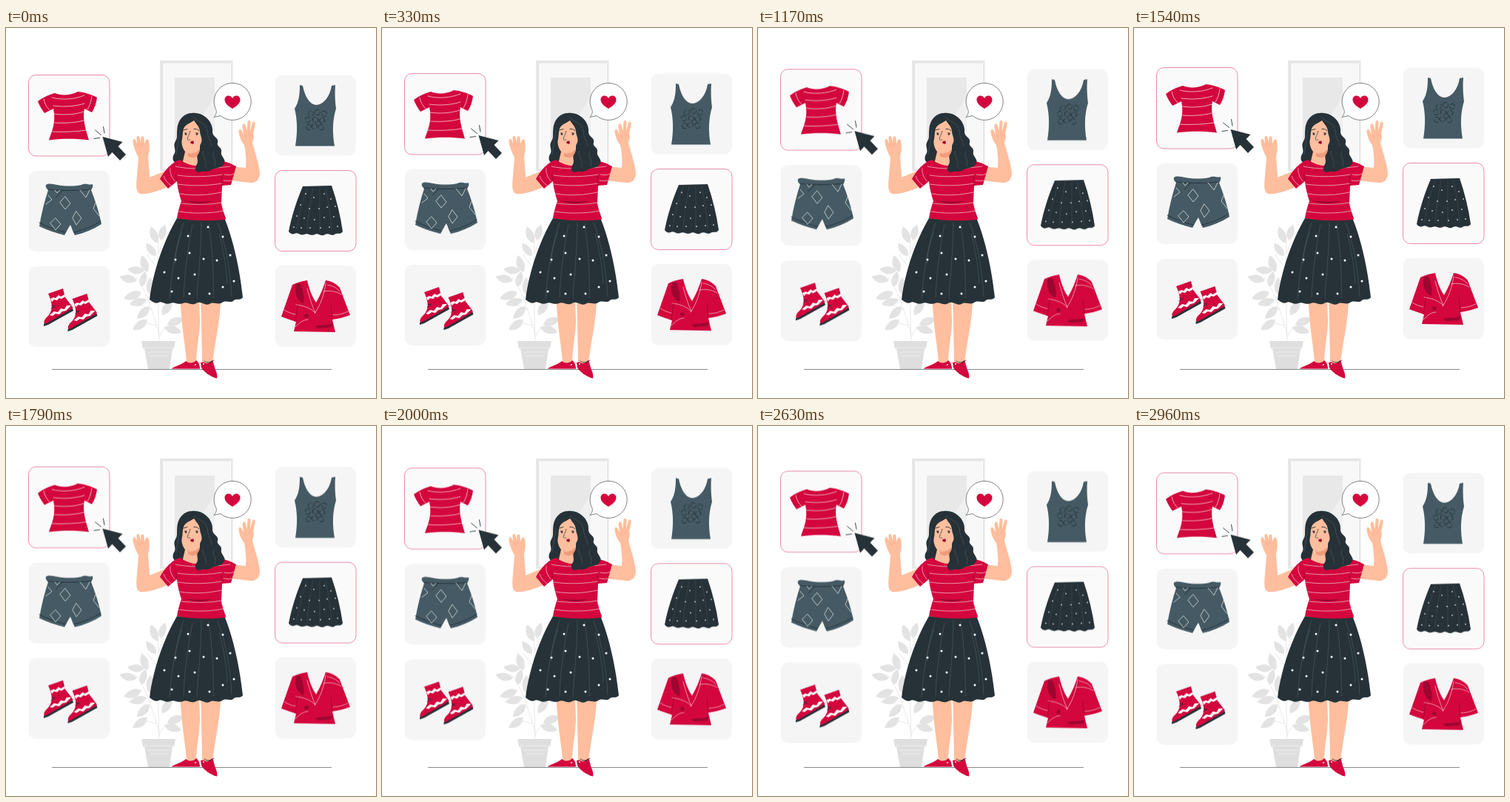
An HTML page without scripts for the animation above (3000 ms loop, 500 by 500 pixels).

```html
<!DOCTYPE html>
<html lang="en">
<head>
<meta charset="utf-8">
<title>Choosing clothes</title>
<style>
  html, body { margin: 0; width: 100%; height: 100%; overflow: hidden; background: #fff; }
  svg { display: block; width: 100vw; height: 100vh; }
  .red { fill: #d3073d; }
  .wine { fill: #9c0630; }
  .dark { fill: #263238; }
  .slate { fill: #455a64; }
  .skin { fill: #ffbe9d; }
  .card { fill: #f5f5f5; }
  .picked { fill: #fafafa; stroke: #d3073d; stroke-width: .45; }
  .line { fill: none; stroke: #fff; stroke-width: .65; stroke-linecap: round; }
  .ink { fill: none; stroke: #263238; stroke-width: .9; stroke-linecap: round; }
  .fold { fill: none; stroke: #52656e; stroke-width: .5; }
  .dots { fill: none; stroke: #fff; stroke-linecap: round; }
  .float { animation: float 3s infinite steps(36); }
  @keyframes float { 50% { transform: translateY(-10px); } }
</style>
</head>
<body>
<svg viewBox="0 0 500 500">
  <defs>
    <path id="leaf" d="M0 0C-7 -6 -7 -14 0 -22C6 -14 6 -6 0 0Z"/>
    <path id="spot" d="M-2 3C-5 1 -4 -3 -1 -3M2 -3C5 -1 4 3 1 3"/>
    <g id="boot">
      <path class="red" d="M57 359L77 352L80 364L90 377L90 381L53 401C50 399 51 394 56 390C63 383 64 374 57 359Z"/>
      <path d="M60 366L64 364L67 365L71 361L74 363L79 360L80 363L75 366L72 365L69 368L65 367L62 370Z" fill="#fff"/>
      <path d="M59 388L65 383L70 384L74 379L79 380L82 375L88 375L84 379L81 382L76 383L72 387L67 386L63 389Z" fill="#fff"/>
      <path class="ink" d="M62 375L66 377M61 379L66 375" stroke-width=".7"/>
      <path class="dark" d="M51 400L55 399L90 379L91 382L57 401L51 403Z"/>
    </g>
  </defs>

  <!-- wall frame -->
  <rect x="208" y="44" width="98.500" height="149" fill="#e6e6e6"/>
  <rect x="212" y="47.500" width="92" height="143" fill="#f8f8f8"/>
  <rect x="228" y="67" width="54" height="110" fill="#e8e8e8"/>
  <path d="M282 92V177H230Z" fill="#f0f0f0"/>
  <path d="M303.500 47V193" stroke="#fff"/>

  <!-- plant -->
  <g fill="#e3e3e3">
    <path d="M207 424C206 390 205 340 206 288M207 415C202 395 190 355 176 337M207 418C212 405 219 400 227 392M205 325L190 306M206 305L213 284M198 381L172 370M203 402L182 397" fill="none" stroke="#e0e0e0" stroke-width=".7"/>
    <use href="#leaf" transform="translate(205 291) rotate(-22) scale(1.1)"/>
    <use href="#leaf" transform="translate(209 287) rotate(16)"/>
    <use href="#leaf" transform="translate(203 308) rotate(-38)"/>
    <use href="#leaf" transform="translate(191 330) rotate(-18) scale(1.1)"/>
    <use href="#leaf" transform="translate(187 328) rotate(-85) scale(1.05)"/>
    <use href="#leaf" transform="translate(177 341) rotate(-78) scale(1.1)"/>
    <use href="#leaf" transform="translate(183 350) rotate(15)"/>
    <use href="#leaf" transform="translate(183 357) rotate(-110) scale(1.15)"/>
    <use href="#leaf" transform="translate(190 367) rotate(-105) scale(1.1)"/>
    <use href="#leaf" transform="translate(194 376) rotate(-135) scale(1.1)"/>
    <use href="#leaf" transform="translate(191 394) rotate(-125) scale(1.1)"/>
    <use href="#leaf" transform="translate(197 363) rotate(-5) scale(1.2)"/>
    <use href="#leaf" transform="translate(211 388) rotate(35) scale(1.1)"/>
    <use href="#leaf" transform="translate(218 401) rotate(70) scale(1.1)"/>
    <use href="#leaf" transform="translate(214 405) rotate(105) scale(1.1)"/>
  </g>
  <path d="M183 423H229L227 433H225L221 461H192L187 433H185Z" fill="#dedede"/>
  <path d="M186 432H226M191 438H222M194 443H219" fill="none" stroke="#f0f0f0" stroke-width=".8"/>
  <path d="M62 461.400H440" stroke="#263238" stroke-width=".6"/>

  <!-- speech bubble -->
  <path d="M284 111A25 25 0 1 1 290 118.500C287 119 284 120 281 120.500C283 118 285 115 284 111Z" fill="#fff" stroke="#263238" stroke-width=".6"/>
  <path class="red" d="M306 109C301 106 295.500 102 295.500 97C295.500 91 303 89.500 306 95C309 89.500 316.500 91 316.500 97C316.500 102 311 106 306 109Z"/>

  <!-- legs and shoes -->
  <path class="skin" d="M235 365H261L262 395C262 415 257 433 257 453H244C243 435 240 420 238 400ZM263 365H290C290 393 283 420 279 453H265C265 433 264 412 264 392Z"/>
  <path class="red" d="M224 460C230 456 238 455 243 450C248 454 254 453 257 449C261 452 262 457 262 460.500H224Z"/>
  <path class="red" d="M263 452C267 450 269 454 273 453L279 449C281 453 281 457 283 462C285 466 286 471 285 473.500C278 472 267 465 264 459Z"/>
  <path class="ink" d="M268 450C271 453 276 453 281 449" stroke-width=".7"/>
  <circle cx="256" cy="455" r="1" fill="#fff"/><circle cx="267" cy="454" r="1" fill="#fff"/>

  <!-- arms -->
  <path class="skin" d="M220 214C207 220 193 225 182 224C175 223 176 212 177 200L179 175C176 169 172 160 171.500 154C171 150 174 149 175.500 152L177 156L176.500 149C176.500 145 179.500 145 180.500 148L182 154L182.500 148C183.500 145 186.500 146 186.500 149L187 156L189 152C191 149 193.500 151 193 154C194 160 194 166 192 173L194 202L215 193Z"/>
  <path class="skin" d="M303 187L324 189C325 179 324 169 322 158C318 153 315 146 314.500 140C314.500 136 317.500 136 318.500 139L321 144L319.500 133C319.500 129 322.500 128 323.500 131L325.500 139L326.500 127C327.500 124 330.500 124 330.500 128L330 139L333 128C335 125 337.500 127 336.500 131L334 143C336 146 334 151 333 155C337 170 342 184 343 196C343 206 337 210 329 209L303 206Z"/>
  <path d="M178 157L181 161M184 156L184 160M323 144L325 148M329 141L329 146" stroke="#f09c7c" stroke-width=".6"/>

  <!-- hair, neck, blouse -->
  <path class="dark" d="M251 115C241 115 234 123 232 132C230 140 233 147 229 153C225 159 230 164 228 169C224 174 224 184 234 182L262 190L280 145L270 121C265 116 258 114 251 115Z"/>
  <path class="skin" d="M243 163L264 160V188L238 184Z"/>
  <path class="red" d="M235 178C224 181 214 193 208 204L219 217L231 207C232 218 235 227 237 234C234 242 232 250 231 257C252 262 277 262 296 260L297 257C294 249 292 243 291 237L292 213L304 212L311 187C302 182 294 179 286 180L262 186C251 187 243 183 235 178Z"/>
  <path class="line" d="M229 187C246 191 271 191 303 187M222 190C221 196 224 202 228 207M213 200C215 206 219 210 223 213M232 199C252 202 274 201 292 198M232 211C252 214 274 213 292 210M235 224C253 227 273 226 291 222M237 237C254 239 275 239 291 236M234 248C252 251 275 251 294 247M295 198C301 199 305 199 308 197M294 206C299 207 303 207 305 206" opacity=".85"/>
  <path class="wine" d="M240 233C253 235 267 235 280 234C270 238 254 239 240 233Z"/>
  <path d="M231 207L229 196M292 213L291 199" fill="none" stroke="#9c0630" stroke-width=".8"/>

  <!-- head -->
  <path d="M245 168C251 172 258 168 263 162V170C258 175 251 177 246 173Z" fill="#f09c7c"/>
  <path class="skin" d="M254 124C246 127 239 132 238 140C236 150 237 161 242 167C246 171 254 170 259 165C265 163 269 156 267 148C266 138 262 129 254 124Z"/>
  <path class="dark" d="M251 118C253 127 261 131 262 139C262 145 266 149 264 155C260 160 264 164 260 170C256 175 261 179 258 184C255 189 254 195 262 195C266 192 271 196 277 192C282 188 290 191 295 183C298 177 289 173 291 167C292 161 284 160 286 155C288 148 279 147 279 141C280 132 275 124 269 120C264 116 257 115 251 118Z"/>
  <path class="dark" d="M258 120C253 129 243 128 240 136C238 144 239 148 237 155L231 148C231 131 239 118 258 120Z"/>
  <path class="fold" d="M254 121C263 129 270 128 272 139C273 149 276 152 278 160M266 166C265 174 272 178 270 188M281 166C277 174 286 177 282 187M235 138C233 152 231 161 230 171"/>
  <path class="ink" d="M240 138L245 136.500M254 136.500C257 136 259 137 261 139M241.500 142L244 142M256.500 142L259.500 142" stroke-width="1"/>
  <circle class="dark" cx="243" cy="143.500" r="1.300"/><circle class="dark" cx="258" cy="143.500" r="1.300"/>
  <path d="M249 139C248 144 245 148 245 150C246 151.500 247 151.500 249 151" fill="none" stroke="#263238" stroke-width=".7"/>
  <path class="wine" d="M249 155C250 152 253 152 254 154C254 157 252 158 249 155Z"/>

  <!-- skirt -->
  <path class="dark" d="M231 257C252 261 277 261 296 259C307 286 316 326 320 364C316 369 312 365 308 368C303 373 298 367 292 371C286 375 281 369 275 373C268 376 264 368 257 372C250 376 245 369 239 372C232 375 227 369 222 372C215 375 211 368 206 371C202 373 198 370 194 367C199 328 213 288 231 257Z"/>
  <path class="fold" d="M240 263C229 295 223 335 221 367M238 275C232 290 229 305 228 319M252 266C245 300 241 335 240 364M264 262C264 300 259 340 258 366M274 264C279 300 281 335 280 365M286 263C298 295 303 330 305 363M288 278C294 300 298 325 299 346"/>
  <path class="dots" stroke-width="3" d="M273 269h0M246 281h0M293 282h0M229 313h0M248 304h0M267 312h0M285 314h0M303 307h0M214 330h0M233 338h0M255 333h0M275 359h0M293 350h0M248 359h0M224 356h0M308 342h0"/>

  <g class="float">
    <!-- cards -->
    <rect class="picked" x="30.500" y="63.500" width="109.500" height="109.500" rx="10"/>
    <rect class="card" x="30.500" y="193" width="109.500" height="109" rx="10"/>
    <rect class="card" x="30.500" y="322" width="109.500" height="109" rx="10"/>
    <rect class="card" x="363.500" y="63.500" width="109.500" height="109" rx="10"/>
    <rect class="picked" x="363.500" y="192.500" width="109.500" height="109" rx="10"/>
    <rect class="card" x="363.500" y="321" width="109.500" height="109.500" rx="10"/>

    <!-- tee -->
    <path class="red" d="M66 88C75 92 88 91 97 86C107 87 116 90 123 94C122 101 120 108 116 114L106 109C103 123 108 138 112 151.500C95 149 75 149 58 151.500C62 139 68 128 64 109L52 115C48 110 45 104 43 99C51 93 59 90 66 88Z"/>
    <path class="line" d="M62 94C76 98 94 96 106 91M64 105C78 107 94 106 106 102M65 116C78 118 94 117 105 113M66 128C78 129 94 128 105 125M62 140C78 141 95 140 108 138M51 96C52 102 55 107 59 111M116 92C115 99 113 106 110 110"/>

    <!-- shorts -->
    <path class="slate" d="M54 212C58 209 63 211 69 212C80 214 92 214 102 212C108 209 113 213 117 211C118 215 116 217 115 219C121 234 126 250 129 265C118 272 106 277 93 280C90 275 89 270 87 266C84 270 82 275 79 280C67 277 55 273 45 268C48 250 52 234 57 219C55 217 53 215 54 212Z"/>
    <path class="ink" d="M57 218C75 220 96 220 115 218M76 219C74 223 71 226 68 228M45 263C56 269 68 273 80 276M92 276C105 273 117 268 128 261" stroke-width=".6"/>
    <path class="line" d="M80 228L87 237L80 245L73 236ZM67 257L74 265L67 273L60 264ZM95 248L102 257L95 266L90 257ZM100 219L108 229L113 219M122 234L118 244L126 254M57 226L62 232L54 238M66 219L69 223L73 219"/>

    <!-- boots -->
    <use href="#boot"/>
    <use href="#boot" x="32.500" y="7"/>

    <!-- tank top -->
    <path class="slate" d="M397 77L401 78C404 93 410 103 419 104C429 104 438 92 440 78L445 77C444 90 445 101 446 109C441 125 441 142 444 159.500H391C394 142 394 125 390 109C396 100 397 90 397 77Z"/>
    <g class="ink" stroke-width="2.600">
      <use href="#spot" x="412" y="116"/>
      <use href="#spot" transform="translate(421 114) rotate(50)"/>
      <use href="#spot" transform="translate(430 116) rotate(100)"/>
      <use href="#spot" transform="translate(408 124) rotate(70)"/>
      <use href="#spot" transform="translate(418 124) rotate(20)"/>
      <use href="#spot" transform="translate(427 125) rotate(-30)"/>
      <use href="#spot" transform="translate(409 134) rotate(110)"/>
      <use href="#spot" transform="translate(417 133) rotate(-20)"/>
      <use href="#spot" transform="translate(426 134) rotate(60)"/>
    </g>

    <!-- small skirt -->
    <path class="dark" d="M401 214L440 213C447 233 452 254 455 275C452 280 448 276 444 279C440 282 436 276 431 279C426 283 422 276 417 279C412 282 408 276 403 279C398 281 394 275 390 278C387 279 384 278 382 275C386 254 393 233 401 214Z"/>
    <path class="fold" opacity=".7" d="M407 216C400 235 395 255 393 273M415 216C411 237 408 257 407 274M424 216L424 275M432 216C436 237 439 256 440 274"/>
    <path class="dots" stroke-width="1.700" d="M405 224h0M416 229h0M430 224h0M439 231h0M398 239h0M410 244h0M423 244h0M434 242h0M445 241h0M393 254h0M403 257h0M417 259h0M430 256h0M443 255h0M389 269h0M399 270h0M411 270h0M425 270h0M437 269h0M448 268h0"/>

    <!-- wrap blouse -->
    <path class="red" d="M387 347C393 344 400 342 407 341C409 350 413 363 419 371C425 361 429 350 432 341C440 342 447 346 451 351L465 388C457 391 449 393 441 394L445 411L389 410L392 397C385 395 378 392 372 390Z"/>
    <path class="wine" d="M392 346C389 356 393 369 402 372C404 364 401 354 398 346ZM418 403C425 400 434 403 441 399C442 404 438 406 432 405C426 406 421 407 418 403Z"/>
    <circle class="wine" cx="406" cy="389" r="2.800"/>
    <path class="line" d="M407 352C410 364 414 376 418 385C411 378 402 375 392 374M432 345C430 360 425 374 417 386M434 347C441 348 447 351 451 356M429 356C438 354 446 356 453 360M376 381C381 384 386 386 391 387M442 388C449 388 456 386 462 383M391 404C397 398 402 394 408 394" opacity=".85"/>
    <path d="M391 397L394 374M441 394L439 374" fill="none" stroke="#9c0630" stroke-width=".8"/>

    <!-- pointer -->
    <path class="dark" d="M130.500 147L157.500 154L151.500 160L162 171L154 179L143.500 168L138 174Z"/>
    <path class="ink" d="M119 149.500L126.500 148.500M120.500 138L128.500 144.500M131.500 133.500L133 142" stroke-width=".6"/>
  </g>
</svg>
</body>
</html>
```
